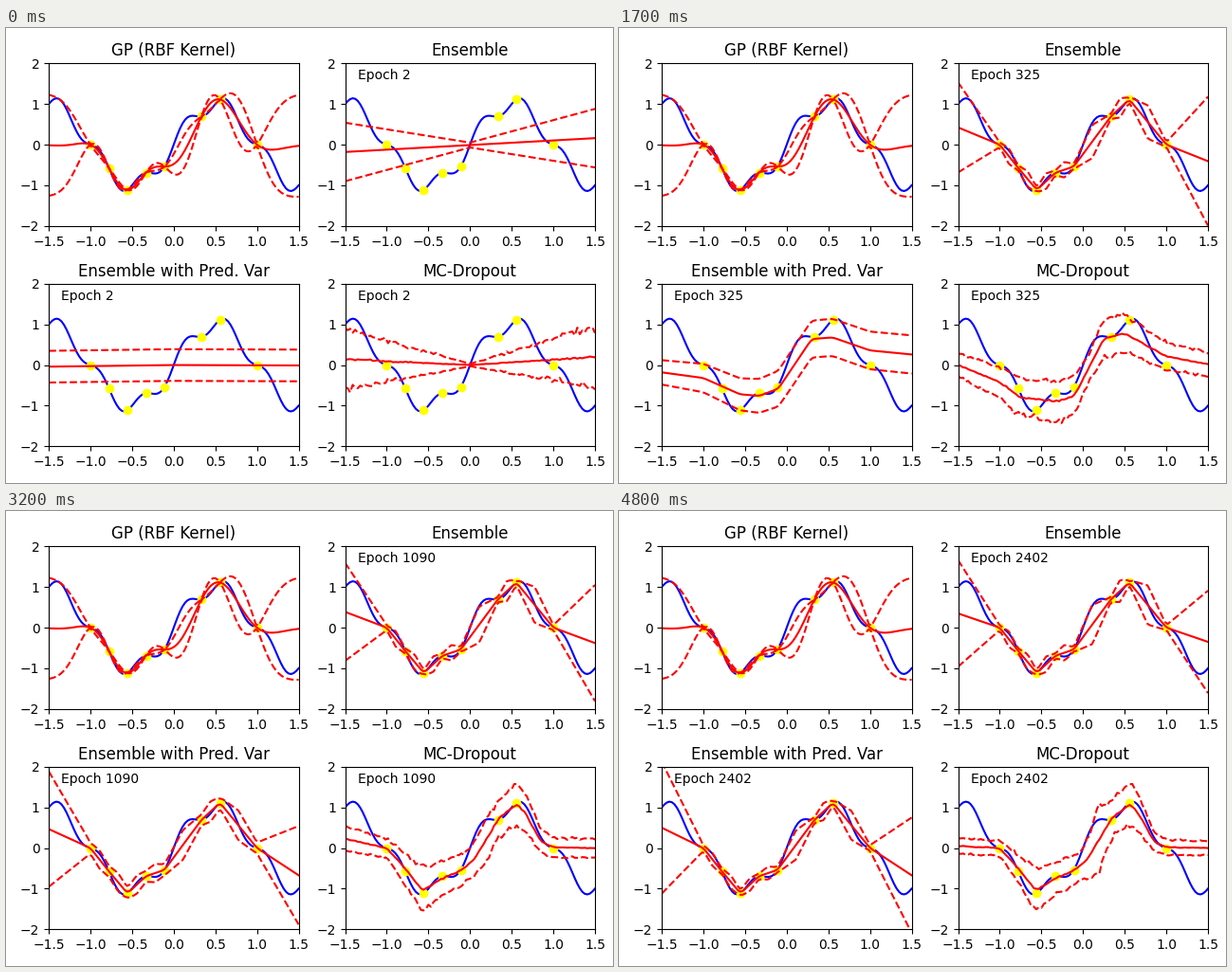
A matplotlib script for the animation above (4.9 s loop, 640 px wide and 480 px high).

```python
import numpy as np
import matplotlib.pyplot as plt
from matplotlib.animation import FuncAnimation

FRAMES, INTERVAL = 49, 100
X = np.linspace(-1.5, 1.5, 100)


def truth(x):
    return np.sin(np.pi * x) + 0.2 * np.sin(4 * np.pi * x)


PX = np.delete(np.linspace(-1, 1, 10), [5, 8])
PY = truth(PX)
GAP = np.abs(X[:, None] - PX).min(axis=1)  # distance to the nearest sample


def rbf(a, b, scale=0.25):
    return np.exp(-(a[:, None] - b) ** 2 / (2 * scale ** 2))


def gp():
    """Posterior mean and two-sigma half width with the best-fit amplitude."""
    K = rbf(PX, PX) + 1e-6 * np.eye(len(PX))
    k = rbf(X, PX)
    alpha = np.linalg.solve(K, PY)
    amp = np.sqrt(PY @ alpha / len(PX))
    var = 1 - np.sum(k * np.linalg.solve(K, k.T).T, axis=1)
    return k @ alpha, 2 * amp * np.sqrt(np.maximum(var, 0))


def soften(y):
    """Round the corners, keeping the slope at both ends."""
    p = np.concatenate([[2 * y[0] - y[1]], y, [2 * y[-1] - y[-2]]])
    return 0.25 * p[:-2] + 0.5 * p[1:-1] + 0.25 * p[2:]


def path(*points):
    return soften(np.interp(X, *zip(*points)))


def fit(left, right):
    """Straight pieces through the samples, run out to both edges."""
    return path((-1.5, left), *zip(PX, PY), (1.5, right))


def fan(left, inner, wide, right):
    """Spread growing away from the samples at a rate for each region."""
    rate = np.select([X < -1, X < PX[4], X < 1], [left, inner, wide], right)
    return rate * GAP


def blend(i, stages):
    """Straight change between the stages, given as {index: curve}."""
    keys = list(stages)
    k = min(np.searchsorted(keys, i, "right"), len(keys) - 1)
    a, b = keys[k - 1], keys[k]
    u = min((i - a) / (b - a), 1)
    return (1 - u) * stages[a] + u * stages[b]


ENSEMBLE_MEAN = {
    0: path((-1.5, -.18), (1.5, .16)),
    10: fit(.44, -.42),
    48: fit(.35, -.35),
}
ENSEMBLE_HALF = {
    0: .06 + .44 * np.abs(X),
    10: .06 + fan(2, 1.2, 1.5, 3.2),
    48: .06 + fan(2.5, 1.2, 1.9, 2.4),
}

VAR_MEAN = {
    0: path((-1.5, -.04), (0, 0), (1.5, -.01)),
    10: path((-1.5, -.75), (-.1, -.25), (.2, .2), (.4, .32), (1.5, .7)),
    17: path((-1.5, -.18), (-1, -.32), (-.56, -.72), (-.33, -.76), (-.1, -.58),
             (.3, .64), (.55, .68), (1, .36), (1.5, .26)),
    24: fit(.45, -.67),
    48: fit(.5, -.67),
}
VAR_HALF = {
    0: .39 + 0 * X,
    10: path((-1.5, .27), (0, .46), (1.5, .35)),
    17: path((-1.5, .3), (0, .45), (1.5, .47)),
    24: .25 + fan(2, .8, .7, 1.35),
    36: .08 + fan(2.85, .8, 1.2, 2.55),
    48: .07 + fan(3.1, .8, 1.3, 2.7),
}


def dropout_fit(left):
    return path((-1.5, left), (-1, 0), (-.78, -.5), (-.57, -1.05), (-.35, -.77),
                (-.1, -.54), (.05, -.28), (.35, .74), (.56, 1.08), (.67, .85),
                (.85, .16), (1, .02), (1.5, 0))


DROP_MEAN = {
    0: path((-1.5, .14), (0, 0), (1.5, .2)),
    10: path((-1.5, -.62), (-.1, -.5), (.2, .3), (1.5, .83)),
    17: path((-1.5, 0), (-1, -.42), (-.75, -.8), (-.3, -.9), (-.1, -.75),
             (.25, .65), (.5, .78), (1, .21), (1.5, .02)),
    24: dropout_fit(.32),
    48: dropout_fit(.05),
}


def dropout_half(i, mean):
    """Spread follows the size of the output, plus the widest inner gap."""
    t = i / (FRAMES - 1)
    gap = .55 * t ** 2 * np.exp(-((X - .17) / .12) ** 2)
    late = .34 - .16 * t + .32 * t ** .3 * np.abs(mean) + gap
    return blend(i, {0: .03 + .47 * np.abs(X), 10: late, 48: late})


def ensemble(i):
    return blend(i, ENSEMBLE_MEAN), blend(i, ENSEMBLE_HALF), (0, 0, 0)


def pred_var(i):
    return blend(i, VAR_MEAN), blend(i, VAR_HALF), (0, 0, 0)


def dropout(i):
    mean = blend(i, DROP_MEAN)
    half = dropout_half(i, mean)
    noise = np.random.default_rng(100 + i).standard_normal((3, len(X)))
    return mean, half, noise * half * np.array([[.02], [.07], [.07]])


fig, axes = plt.subplots(2, 2, figsize=(6.4, 4.8), dpi=100)


def panel(ax, title):
    ax.set_title(title)
    ax.set(xlim=(-1.5, 1.5), ylim=(-2, 2),
           xticks=np.arange(-1.5, 1.6, .5), yticks=range(-2, 3))
    ax.plot(X, truth(X), "b-")
    ax.plot(PX, PY, "o", color="yellow")
    lines = [ax.plot(X, 0 * X, style, color="red")[0] for style in ("-", "--", "--")]
    return lines, ax.text(-1.35, 1.6, "")


def show(lines, mean, half, noise=(0, 0, 0)):
    for line, side, extra in zip(lines, (0, 1, -1), noise):
        line.set_ydata(mean + side * half + extra)


gp_lines, _ = panel(axes[0, 0], "GP (RBF Kernel)")
show(gp_lines, *gp())
PANELS = [
    (*panel(axes[0, 1], "Ensemble"), ensemble),
    (*panel(axes[1, 0], "Ensemble with Pred. Var"), pred_var),
    (*panel(axes[1, 1], "MC-Dropout"), dropout),
]
fig.tight_layout()
fig.subplots_adjust(left=45.1 / 640, right=621 / 640, wspace=49 / 263.5)


def update(i):
    for lines, label, model in PANELS:
        show(lines, *model(i))
        label.set_text(f"Epoch {(i + 1) ** 2 + 1}")
    return []


anim = FuncAnimation(fig, update, frames=FRAMES, interval=INTERVAL,
                     repeat=True, repeat_delay=0)
plt.show()
```
